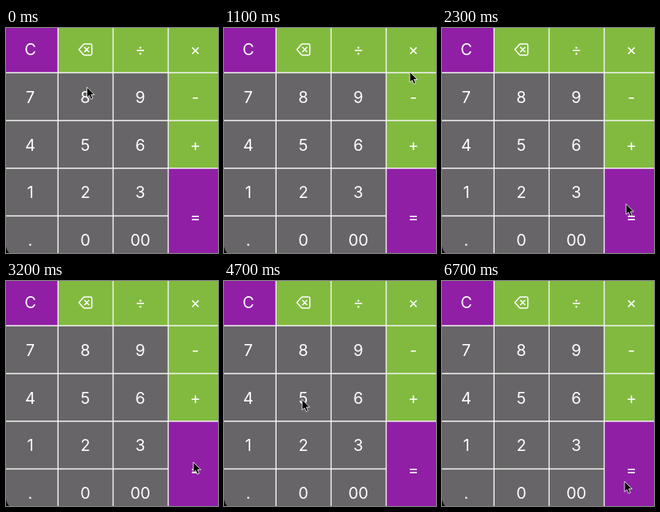
An HTML page that plays this animation: 266x282 px, repeating every 7.6 s.

```html
<!DOCTYPE html>
<html lang="en">
<head>
<meta charset="utf-8">
<title>Calculator keypad</title>
<style>
  html, body { margin: 0; width: 100%; height: 100%; overflow: hidden; background: #676567; }
  svg { display: block; width: 100%; height: 100%; }
  text { font: 20px Inter, Roboto, sans-serif; fill: #fff; text-anchor: middle; }
  .line { fill: none; stroke: #f4f3f4; stroke-width: 1.4; }
  .icon { fill: none; stroke: #fff; stroke-width: 1.5; stroke-linejoin: round; stroke-linecap: round; }
</style>
</head>
<body>
<svg viewBox="0 0 266 282">
  <rect width="266" height="282" fill="#676567"/>
  <rect width="65" height="56" fill="#901fa6"/>
  <path d="M65 0H266V176H203.500V56H65Z" fill="#82ba3f"/>
  <rect x="203.500" y="176" width="63" height="106" fill="#901fa6"/>
  <path class="line" d="M65.300 0V282M134.400 0V282M203.500 0V282M0 56H266M0 116H266M0 175.800H266M0 235.500H203.500"/>
  <path d="M0 274Q1 279 4 282H0Z" fill="#080808"/>
  <g id="keys"></g>
  <path class="icon" d="M91.500 27L97 20.700Q97.600 20 98.500 20H106Q107.700 20 107.700 21.700V32.300Q107.700 34 106 34H98.500Q97.600 34 97 33.300ZM98.600 24.200L104 29.800M104 24.200L98.600 29.800"/>
  <path id="cursor" d="M0 0V13.200L3 10.500L5 15.200L7.400 14.200L5.400 9.600H9.500Z" fill="#050505" stroke="#fff" stroke-width=".8"/>
</svg>
<script>
  const LOOP = 7600, STEP = 100;
  const columns = [30.5, 99.5, 168.5, 237.5];
  const rows = [27, 87, 147, 206, 266];
  const labels = [
    ['C', '', '÷', '×'],
    ['7', '8', '9', '-'],
    ['4', '5', '6', '+'],
    ['1', '2', '3', ''],
    ['.', '0', '00', '']
  ];

  function addLabel(label, x, y) {
    const text = document.createElementNS('http://www.w3.org/2000/svg', 'text');
    text.setAttribute('x', x);
    text.setAttribute('y', y + 7.2);
    text.textContent = label;
    document.getElementById('keys').append(text);
  }
  labels.forEach((row, r) => row.forEach((label, c) => {
    if (label) addLabel(label, columns[c], rows[r]);
  }));
  addLabel('=', columns[3], 237);

  // Each move: start time, end time, destination of the pointer tip.
  const home = [101.5, 74];
  const moves = [
    [0, 600, 251.5, 25.5],
    [900, 1500, 180.5, 139],
    [1800, 2400, 235, 227],
    [3200, 3800, 239, 147],
    [4100, 4700, 98, 148.5],
    [5200, 5600, 229, 251]
  ];

  function pointerAt(time) {
    let [x, y] = home;
    for (const [start, end, toX, toY] of moves) {
      if (time <= start) break;
      const p = Math.min(1, (time - start) / (end - start));
      const eased = p * p * (3 - 2 * p);
      x += (toX - x) * eased;
      y += (toY - y) * eased;
    }
    return [x, y];
  }

  const cursor = document.getElementById('cursor');
  const origin = performance.now();
  function draw() {
    const elapsed = (performance.now() - origin) % LOOP;
    const time = Math.floor(elapsed / STEP) * STEP;
    cursor.setAttribute('transform', `translate(${pointerAt(time)})`);
    requestAnimationFrame(draw);
  }
  draw();
</script>
</body>
</html>
```
